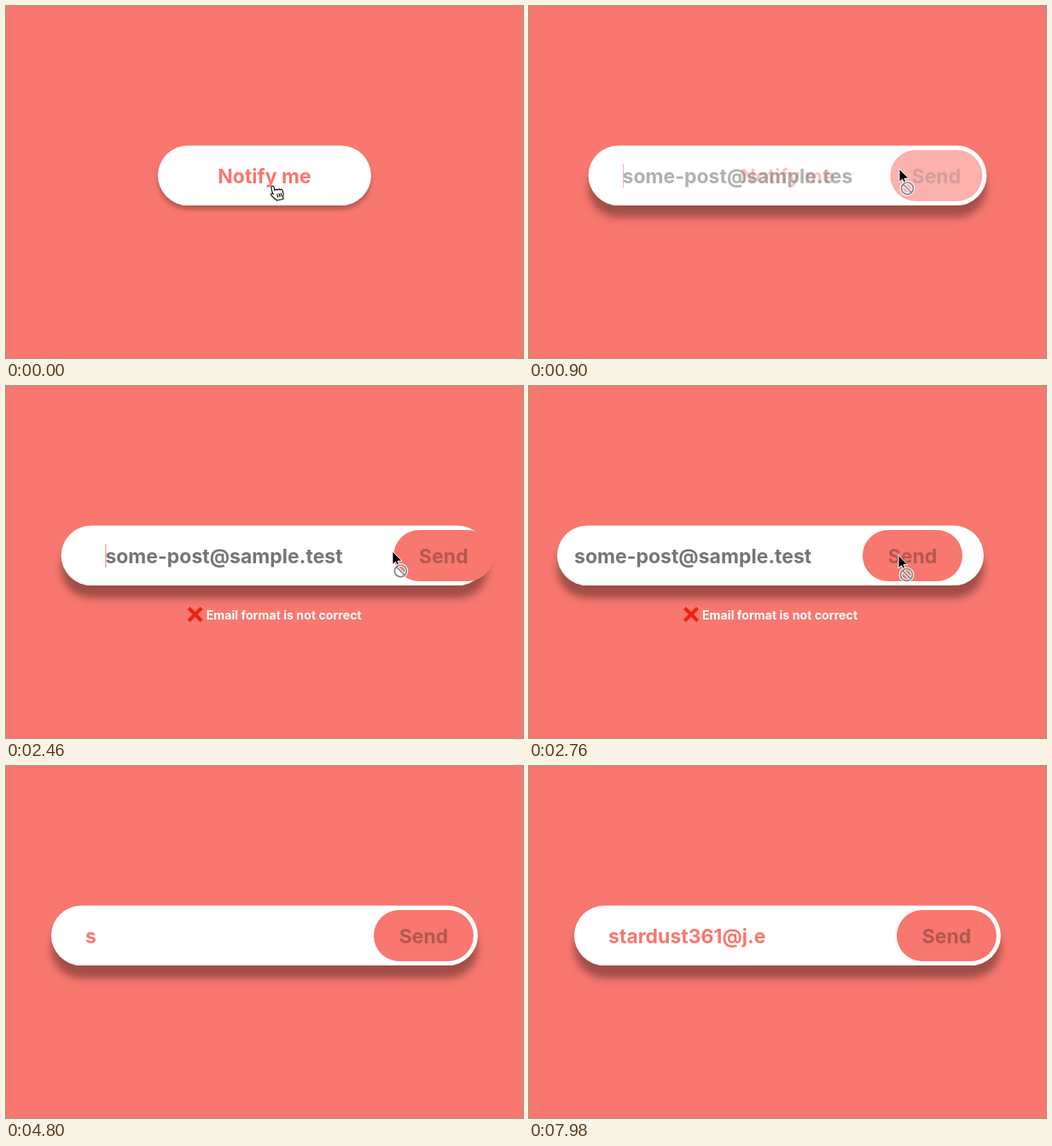
Write an HTML page that moves like this. It is 606 px wide and 413 px high and loops after 8000 ms.

```html
<!DOCTYPE html>
<html lang="en">
<head>
<meta charset="utf-8">
<title>Notify me</title>
<style>
  html, body { margin: 0; width: 100%; height: 100%; overflow: hidden; background: #f8776e; }
  svg { display: block; width: 606px; height: 413px; }
  text { font: 700 23px Inter, "Noto Sans", sans-serif; white-space: pre; }
  .mid { text-anchor: middle; }
  #jamo { font: 700 20px "Noto Sans CJK KR", "Noto Sans CJK JP", sans-serif; }
  #message text { font-size: 14.2px; }
</style>
</head>
<body>
<svg viewBox="0 0 606 413">
  <defs>
    <filter id="soft" filterUnits="userSpaceOnUse" x="0" y="130" width="606" height="160">
      <feGaussianBlur id="blur" stdDeviation="2.5"/>
    </filter>
    <clipPath id="inputClip"><rect id="clip" y="164" height="70"/></clipPath>
  </defs>
  <rect width="606" height="413" fill="#f8776e"/>
  <g id="wrap">
    <rect id="shadow" height="70" rx="35" filter="url(#soft)"/>
    <rect id="pill" y="163.700" height="70.400" rx="35.200" fill="#fff"/>
    <text id="notify" class="mid" x="303" y="208" fill="#f8776e">Notify me</text>
    <g id="form">
      <g clip-path="url(#inputClip)">
        <text id="hint" y="208" fill="#757575">some-post@sample.test</text>
        <text id="typed" y="208" fill="#f8776e"></text>
        <g id="compose">
          <text id="jamo" x="94" y="207" fill="#f8776e">ㄴ</text>
          <rect x="94" y="211" width="19" height="2" fill="#4a4a4a"/>
        </g>
        <rect id="caret" y="185" width="1" height="28" fill="#f8776e"/>
      </g>
      <rect id="send" y="169" height="60" rx="30" fill="#f8776e"/>
      <text id="label" class="mid" y="208" fill="#101010" fill-opacity=".3">Send</text>
    </g>
    <g id="message">
      <path d="M202.500 260.500L217.500 275.500M217.500 260.500L202.500 275.500" stroke="#ea2410" stroke-width="4.200"/>
      <text x="223" y="274" fill="#fff">Email format is not correct</text>
    </g>
  </g>
  <g id="hand">
    <path transform="translate(-1.800 -.3) rotate(-13) scale(1.080)" fill="#fff" stroke="#000" stroke-linejoin="round"
      d="M-1.500 8V1.200a1.500 1.500 0 0 1 3 0V5q.2-1 1.400-1t1.500 1.200q.3-.8 1.400-.8t1.500 1.300q.3-.5 1.200-.5
      q1.300 0 1.300 1.600V10q0 2-1.200 3.500V16H1V15q-2.500-2.500-4-5.300q-1-1.800 .2-2.400q1.200-.5 2.300 1Z
      M3.200 9v4M5.400 9v4M7.400 9v4"/>
  </g>
  <g id="arrow">
    <path d="M0 0V15.500L3.600 12.200L6 17.500L8.400 16.400L6 11.300H11Z" fill="#000" stroke="#fff"/>
    <g fill="none" stroke="#fff" stroke-width="3.800">
      <path id="ban" d="M2.500 23a7 7 0 1 0 14 0a7 7 0 1 0 -14 0M4.600 18L14.400 28"/>
    </g>
    <use href="#ban" fill="none" stroke="#858585" stroke-width="1.700"/>
  </g>
</svg>
<script>
const LOOP = 8000, STEP = 60;
const OPEN = 440, SHAKE = 2162, DURATION = 800;
const JAMO = 3050, ERASE = 4070;
const ADDRESS = 'stardust361@j.e';
const KEYS = [4325, 4910, 4980, 5090, 5160, 5270, 5380, 5460, 5570, 5635, 5702, 6235, 6530, 7070, 7325];
const BLINKS = [560, SHAKE, JAMO, 3330, ERASE, ...KEYS];
// time, x, y
const POINTER = [
  [0, 314, 212], [OPEN, 314, 212], [900, 434, 191], [1200, 426, 197], [1560, 426, 197],
  [1620, 460, 197], [SHAKE, 460, 197], [2460, 453, 194], [2940, 421, 201], [JAMO, 421, 201]
];

const el = {};
document.querySelectorAll('[id]').forEach(node => { el[node.id] = node; });

const set = (node, attrs) => {
  for (const key in attrs) node.setAttribute(key, attrs[key]);
};
const show = (node, on) => node.setAttribute('visibility', on ? 'visible' : 'hidden');
const clamp = v => Math.max(0, Math.min(1, v));
const mix = (a, b, p) => a + (b - a) * p;

// cubic-bezier(.25, .1, .25, 1)
function ease(x) {
  if (x <= 0 || x >= 1) return clamp(x);
  const curve = (s, a, b) => 3 * s * (1 - s) ** 2 * a + 3 * s * s * (1 - s) * b + s ** 3;
  let lo = 0, hi = 1;
  for (let i = 0; i < 20; i++) {
    const s = (lo + hi) / 2;
    if (curve(s, .25, .25) < x) lo = s; else hi = s;
  }
  return curve(lo, .1, 1);
}

function shakeAt(t) {
  const stops = [0, -20, 20, -20, 0];
  const p = (t - SHAKE) / DURATION * 4;
  if (p <= 0 || p >= 4) return 0;
  const i = Math.floor(p);
  return mix(stops[i], stops[i + 1], ease(p - i));
}

function pointerAt(t) {
  const i = POINTER.findIndex(k => k[0] > t);
  if (i < 0) return null;
  const [t0, x0, y0] = POINTER[i - 1], [t1, x1, y1] = POINTER[i];
  const p = (t - t0) / (t1 - t0);
  return [mix(x0, x1, p), mix(y0, y1, p)];
}

function caretOn(t) {
  const last = BLINKS.filter(b => b <= t).pop() ?? OPEN;
  return t >= OPEN && (t - last) % 1000 < 475;
}

function draw(t) {
  const grow = ease((t - OPEN) / DURATION);
  const fade = clamp((t - OPEN) / DURATION);
  const hover = ease(t / 300);
  const width = mix(250, 500, grow), left = 303 - width / 2;
  const shift = shakeAt(t);
  const move = `translate(${shift} 0)`;

  set(el.wrap, { transform: move });
  set(el.pill, { x: left, width });
  set(el.blur, { stdDeviation: mix(2.5, 5, hover) });
  set(el.shadow, {
    x: left, y: 164 + mix(mix(5, 10, hover), 15, grow), width,
    'fill-opacity': mix(mix(.25, .3, hover), .35, grow)
  });
  set(el.notify, { opacity: 1 - fade });

  const sendWidth = 117 - (500 - width) * .27;
  const sendLeft = left + width - 5 - sendWidth;
  const inputLeft = left + 40;
  set(el.form, { opacity: fade, transform: move });
  set(el.clip, { x: inputLeft - 1, width: Math.max(0, sendLeft - 43 - inputLeft) });
  set(el.send, { x: sendLeft, width: sendWidth });
  set(el.label, { x: sendLeft + sendWidth / 2 });

  const count = KEYS.filter(k => k <= t).length;
  const composing = t >= JAMO && t < ERASE;
  el.typed.textContent = ADDRESS.slice(0, count);
  set(el.typed, { x: inputLeft });
  set(el.hint, { x: inputLeft });
  show(el.hint, !count && !composing);
  show(el.compose, composing);
  const advance = composing ? 21 : count ? el.typed.getComputedTextLength() : 0;
  set(el.caret, { x: Math.round(inputLeft + advance) });
  show(el.caret, caretOn(t));

  set(el.message, { opacity: ease((t - SHAKE) / 200) * (1 - ease((t - 3340) / 220)) });

  const tip = pointerAt(t);
  const blocked = tip && tip[0] >= sendLeft + 2 * shift - 2;
  show(el.arrow, tip && blocked);
  show(el.hand, tip && !blocked);
  if (tip) set(blocked ? el.arrow : el.hand, { transform: `translate(${tip})` });
}

const start = performance.now();
function tick() {
  const t = (performance.now() - start) % LOOP;
  draw(Math.floor(t / STEP) * STEP);
  requestAnimationFrame(tick);
}
tick();
</script>
</body>
</html>
```
